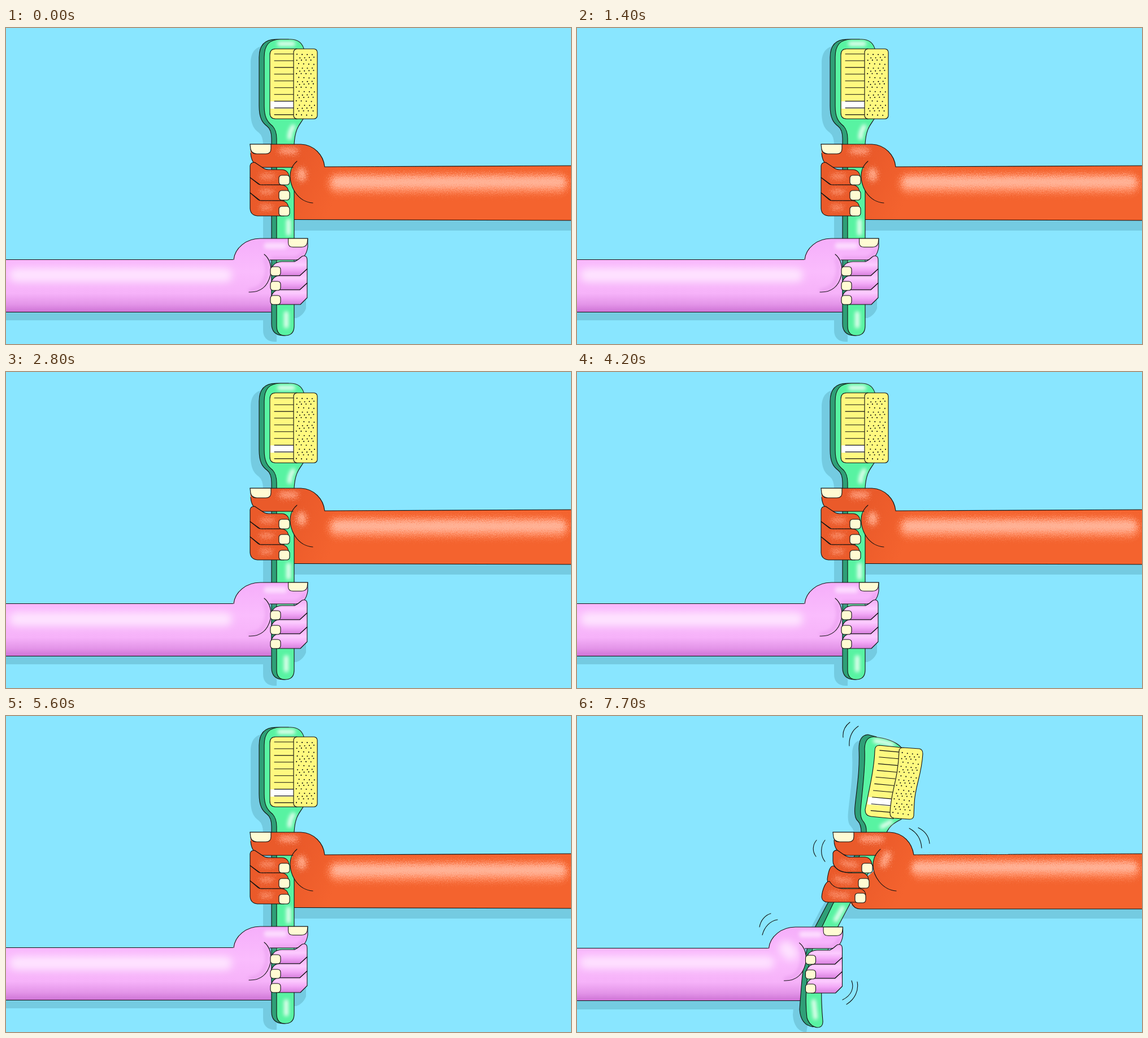
Animation, 1000 px wide and 560 px high, one loop 8000 ms. Source, as an HTML page:

```html
<!DOCTYPE html>
<html lang="en">
<head>
<meta charset="utf-8">
<title>Toothbrush tug</title>
<style>
  html, body { margin: 0; width: 100%; height: 100%; overflow: hidden; background: #89e6ff; }
  svg { display: block; width: 100vw; height: 100vh; }
  .ink { fill: none; stroke: #111; stroke-width: 1.1; stroke-linecap: round; stroke-linejoin: round; }
  .shade { fill: #74cbe1; }
  .side { fill: #2f9f77; stroke: #111; stroke-width: 1.1; }
  .front { fill: #58f3a2; stroke: #111; stroke-width: 1.1; }
  .bristle { fill: #fff97f; stroke: #111; stroke-width: 1.1; }
  .orange { fill: url(#orangeSkin); }
  .pink { fill: url(#pinkSkin); }
  .finger { stroke: #111; stroke-width: 1.1; stroke-linejoin: round; }
  .pink .finger { fill: url(#pinkFinger); }
  .nail { fill: #fffbd3; stroke: #111; stroke-width: 1.1; }
  .glow { fill: none; stroke-linecap: round; stroke-linejoin: round; }
  /* hard swap between rest and pull every 700 ms, cut at 8 s */
  #pull { opacity: 0; animation: swap 8s step-end infinite; }
  @keyframes swap {
    0%, 17.5%, 35%, 52.5%, 70%, 87.5% { opacity: 0; }
    8.75%, 26.25%, 43.75%, 61.25%, 78.75%, 96.25% { opacity: 1; }
    100% { opacity: 0; }
  }
</style>
</head>
<body>
<svg viewBox="0 0 1000 560" preserveAspectRatio="none">
  <defs>
    <linearGradient id="orangeSkin" gradientUnits="userSpaceOnUse" x1="520" y1="230" x2="600" y2="270">
      <stop offset="0" stop-color="#ea5a2a"/>
      <stop offset="1" stop-color="#f4632e"/>
    </linearGradient>
    <linearGradient id="pinkSkin" gradientUnits="userSpaceOnUse" x1="0" y1="373" x2="0" y2="503">
      <stop offset="0" stop-color="#f5aefa"/>
      <stop offset=".45" stop-color="#fabcfd"/>
      <stop offset=".75" stop-color="#f6b2f9"/>
      <stop offset=".9" stop-color="#e394e8"/>
      <stop offset="1" stop-color="#cf74d6"/>
    </linearGradient>
    <linearGradient id="pinkFinger" x1="0" y1="0" x2="0" y2="1">
      <stop offset="0" stop-color="#f3acf7"/>
      <stop offset=".45" stop-color="#fccbff"/>
      <stop offset=".7" stop-color="#f3aaf7"/>
      <stop offset="1" stop-color="#d77fdd"/>
    </linearGradient>
    <filter id="soft" filterUnits="userSpaceOnUse" x="-100" y="-20" width="1200" height="600">
      <feGaussianBlur stdDeviation="3"/>
    </filter>
    <filter id="wide" filterUnits="userSpaceOnUse" x="-100" y="-20" width="1200" height="600">
      <feGaussianBlur stdDeviation="7"/>
    </filter>
    <filter id="grain" filterUnits="userSpaceOnUse" x="400" y="190" width="620" height="170" color-interpolation-filters="sRGB">
      <feGaussianBlur in="SourceGraphic" stdDeviation="3.5" result="blur"/>
      <feTurbulence type="fractalNoise" baseFrequency=".8" numOctaves="2" seed="4"/>
      <feColorMatrix values="1 0 0 0 0  0 1 0 0 0  0 0 1 0 0  0 0 0 0 1" result="noise"/>
      <feDisplacementMap in="blur" in2="noise" scale="24" xChannelSelector="R" yChannelSelector="G"/>
    </filter>

    <path id="sideRest" d="M478 20C458 20 448 30 448 52V138C448 160 454 168 462 174Q470 180 470 196V524Q470 544 490 545H494L500 200V20Z"/>
    <path id="sidePull" d="M515 33Q499 34 499 58C501 95 495 130 492 160Q490 180 497 186Q503 192 503 206C498 250 470 285 443 333L422 373C405 410 400 440 397 480L394 520Q396 548 418 551L426 500 440 400 490 310 530 210V37Z"/>

    <rect id="nailO" class="nail" width="19" height="17" rx="5"/>
    <rect id="nailP" class="nail" width="18" height="16" rx="5"/>
    <path id="thumbNail" class="nail" d="M0 0H37V8Q37 17 28 17H12Q3 17 1 9Z"/>

    <g id="pinkArm">
      <path class="pink" d="M-10 410.5H403L430 390 469 420V503.5H-10Z"/>
      <path class="ink" d="M-10 410.5H403M-10 503.5H469"/>
    </g>
    <g id="pinkHand">
      <path class="pink" d="M402 410.5C405 390 425 373 450 373H534V388C532 403 524 411 513 411H466Q470 424 468 438C463 458 450 468 430 468H402Z"/>
      <g class="glow" filter="url(#soft)">
        <path d="M459 410Q468 436 452 457Q444 464 432 465" stroke="#e08fe6" stroke-width="5" opacity=".6"/>
        <path d="M470 408H512Q524 406 528 394" stroke="#dc86e2" stroke-width="4" opacity=".7"/>
        <path d="M462 386H492" stroke="#fddcff" stroke-width="11"/>
      </g>
      <path class="ink" d="M403 410.5C405 390 425 373 450 373H534V388C532 403 524 411 513 411H467M457 401C467 409 471 424 468 438C463 458 450 469 430 468"/>
      <use href="#thumbNail" transform="translate(534 373) scale(-.93 .9)"/>
      <g class="pink">
        <path class="finger" d="M469 431Q471 415 488 414H511Q517 411 521 407Q525 403 529 404Q533 405 533 411V427L520 439H478Z"/>
        <path class="finger" d="M470 449Q474 440 482 439H520L533 427V452L520 464H478Z"/>
        <path class="finger" d="M470 474Q474 465 482 464H520L533 452V478L521 490H478Z"/>
      </g>
      <use href="#nailP" x="468" y="423"/>
      <use href="#nailP" x="468" y="449"/>
      <use href="#nailP" x="468" y="474"/>
    </g>
  </defs>

  <g id="rest">
    <rect width="1000" height="560" fill="#89e6ff"/>
    <g class="shade">
      <use href="#sideRest" x="-15" y="11"/>
      <path d="M455 30H500V545H480V180H455Z"/>
      <path d="M500 335H1000V359H500ZM0 500H470V518H0ZM500 480H531V497Q526 510 514 514H500Z"/>
    </g>

    <path class="orange" d="M1010 244L540 246 509 260V340L1010 341Z"/>
    <path class="ink" d="M564 246L1010 244M509 339.5L1010 341"/>
    <use href="#pinkArm"/>

    <use href="#sideRest" class="side"/>
    <path class="front" d="M486 20H504C521 20 529 32 529 50V150C529 168 512 166 510 206V528Q510 545 494 545Q479 545 479 528V196Q479 182 472 174C462 166 457 158 457 138V52C457 30 466 20 486 20Z"/>
    <g class="glow" filter="url(#soft)" stroke="#e4fff0" stroke-width="8">
      <path d="M484 28H508M508 175Q502 184 502 194M500 342V364M496 506V528"/>
    </g>
    <path class="bristle" d="M515 37H477Q467 37 467 48V150Q467 161 477 161H515Z"/>
    <g data-bristles="rest"></g>
    <rect class="bristle" x="509" y="37" width="42" height="124" rx="6"/>
    <g data-dots="rest"></g>

    <path class="orange" d="M432 206H522C545 207 562 225 564 245V311H543C515 306 503 280 503 262Q503 253 508 247H455C440 246 434 235 433 222Z"/>
    <g class="glow" filter="url(#grain)">
      <path d="M588 276H978" stroke="#f97545" stroke-width="44" opacity=".6"/>
      <path d="M588 275H978" stroke="#ff8d63" stroke-width="32"/>
      <path d="M586 273H980" stroke="#ffb296" stroke-width="18"/>
      <path d="M488 218H512" stroke="#ffa080" stroke-width="10"/>
      <path d="M523 256V264" stroke="#ffa584" stroke-width="16"/>
    </g>
    <path class="ink" d="M432 206H522C545 207 562 225 564 246M433 222C434 235 440 246 455 247H508M515 236C508 242 503 250 503 262C503 282 516 308 543 310"/>
    <use href="#thumbNail" x="432" y="206"/>
    <g class="orange">
      <path class="finger" d="M432 244Q433 238 440 238L455 248Q459 251 465 251H489Q499 252 501 262L492 278H450L432 265Z"/>
      <path class="finger" d="M432 265L446 276Q448 278 452 278H488Q498 279 500 289L492 306H450L432 292Z"/>
      <path class="finger" d="M432 292L446 304Q448 306 452 306H488Q498 307 500 317L492 333H445Q433 332 432 320Z"/>
    </g>
    <g class="glow" filter="url(#grain)">
      <path d="M453 263H472M453 290H470M453 318H468" stroke="#ff9c7a" stroke-width="7"/>
    </g>
    <use href="#nailO" x="483" y="261"/>
    <use href="#nailO" x="483" y="288"/>
    <use href="#nailO" x="483" y="316"/>
    <use href="#pinkHand"/>
    <g class="glow" filter="url(#wide)">
      <path d="M18 438H388" stroke="#fee4ff" stroke-width="24"/>
    </g>
  </g>

  <g id="pull">
    <rect width="1000" height="560" fill="#89e6ff"/>
    <g class="shade">
      <use href="#sidePull" x="-12" y="10"/>
      <path d="M470 335H1000V359H470ZM0 500H400V520H0Z"/>
    </g>

    <path class="orange" d="M1010 244L560 246 495 300 484 330Q488 342 502 342H1010Z"/>
    <path class="ink" d="M596 246L1010 244M486 331Q490 342 502 342H1010"/>
    <use href="#pinkArm" x="-63.5" y="1"/>

    <use href="#sidePull" class="side"/>
    <path class="front" d="M526 37C545 39 565 45 574 56V183C560 190 550 196 545 215C532 262 505 290 483 333L462 373C447 402 437 430 434 460Q431 495 435 540Q436 552 425 552Q412 550 407 535Q403 500 408 460C412 420 420 400 434 373L453 333C480 290 505 250 512 206Q513 194 506 186Q501 180 502 165C505 130 511 90 509 58Q510 36 526 37Z"/>
    <g class="glow" filter="url(#soft)" stroke="#e4fff0" stroke-width="8">
      <path d="M528 44Q545 46 558 51M555 188L540 196M470 340L458 361M419 506L422 534"/>
    </g>
    <path class="bristle" d="M575 56L535 52Q527 52 527 62C526 95 518 125 514 147L510 166Q510 177 520 178L560 182Z"/>
    <g data-bristles="pull"></g>
    <path class="bristle" d="M577 56L606 58Q612 59 612 67C610 105 598 125 597 155L596 177Q595 183 589 183L561 181Q554 180 554 172C555 135 568 115 570 63Q570 56 577 56Z"/>
    <g data-dots="pull"></g>

    <path class="orange" d="M453 206H553C578 207 593 225 596 245V311H565C540 305 524 283 524 264Q524 254 529 247H478C463 245 455 235 455 220Z"/>
    <g class="glow" filter="url(#grain)">
      <path d="M608 272H980" stroke="#f97545" stroke-width="42" opacity=".6"/>
      <path d="M606 270H980" stroke="#ff8d63" stroke-width="30"/>
      <path d="M602 268H982" stroke="#ffb296" stroke-width="16"/>
      <path d="M506 218H538" stroke="#ffa080" stroke-width="11"/>
      <path d="M549 246L543 262" stroke="#ffa584" stroke-width="14"/>
    </g>
    <path class="ink" d="M453 206H553C578 207 593 225 596 246M455 220C455 235 463 245 478 247H529M537 236C529 243 524 252 524 264C524 284 540 308 565 310"/>
    <use href="#thumbNail" x="453" y="206"/>
    <g class="orange">
      <path class="finger" d="M453 243Q455 237 461 238L474 247Q478 250 485 250H510Q520 251 522 262L514 277H476C461 275 453 266 453 257Z"/>
      <path class="finger" d="M443 289C445 275 448 264 455 266C462 275 470 277 481 278H505Q514 279 516 289L508 305H464C452 304 443 300 443 289Z"/>
      <path class="finger" d="M433 321C434 308 440 292 447 293C453 303 460 305 470 306H500Q509 307 511 316L502 330H445Q434 330 433 321Z"/>
    </g>
    <g class="glow" filter="url(#grain)">
      <path d="M470 259Q478 264 494 264M459 288Q466 292 484 292M450 315Q460 319 478 318" stroke="#ff9c7a" stroke-width="7"/>
    </g>
    <use href="#nailO" x="504" y="261"/>
    <use href="#nailO" x="498" y="288"/>
    <use href="#nailO" x="492" y="314"/>
    <use href="#pinkHand" x="-63.5" y="1"/>
    <g class="glow" filter="url(#wide)">
      <path d="M16 437H338" stroke="#fee2ff" stroke-width="22"/>
      <path d="M370 412L378 420" stroke="#fee2ff" stroke-width="26"/>
    </g>

    <path class="ink" d="M483 11C474 18 470 28 471 38M498 18C487 25 481 38 482 53
      M604 198C616 204 623 214 624 226M588 199C601 206 609 218 610 234
      M424 220C417 228 416 240 423 249M439 220C431 230 430 247 439 258
      M323 374C325 362 333 353 343 350M328 388C332 373 342 363 355 361
      M486 469C491 482 486 495 470 503M496 471C499 486 492 502 477 511"/>
  </g>
</svg>
<script>
  // Each pose maps a point of the upright brush head to the stage.
  const poses = {
    rest: (x, y) => [x, y],
    pull: (x, y) => {
      const v = (y - 37) / 124, u = x - 509;
      return [570 - 16 * v * v * (3 - 2 * v) + u, 55 + 123 * v + 0.09 * u];
    }
  };
  const at = p => p.map(n => n.toFixed(1)).join(' ');
  const jitter = n => Math.sin(n * 12.9898) * 1.2;

  for (const [name, warp] of Object.entries(poses)) {
    const band = [[468, 130], [509, 130], [509, 143], [468, 143]].map(p => at(warp(...p)));
    let lines = '';
    for (let i = 0; i < 10; i++) {
      const y = 46 + i * 11.95;
      lines += `M${at(warp(475, y))}L${at(warp(509, y))}`;
    }
    document.querySelector(`[data-bristles=${name}]`).innerHTML =
      `<path d="M${band.join('L')}Z" fill="#fff"/><path class="ink" d="${lines}"/>`;

    let dots = '';
    for (let row = 0; row < 19; row++) {
      for (let col = 0; col < 4; col++) {
        const n = row * 4 + col;
        const x = 515 + (row % 2) * 4 + col * 8.6 + jitter(n);
        const y = 46 + row * 6 + jitter(n + 90);
        if (x < 547) dots += `M${at(warp(x, y))}h.01`;
      }
    }
    document.querySelector(`[data-dots=${name}]`).innerHTML =
      `<path class="ink" style="stroke-width:2.1" d="${dots}"/>`;
  }
</script>
</body>
</html>
```
